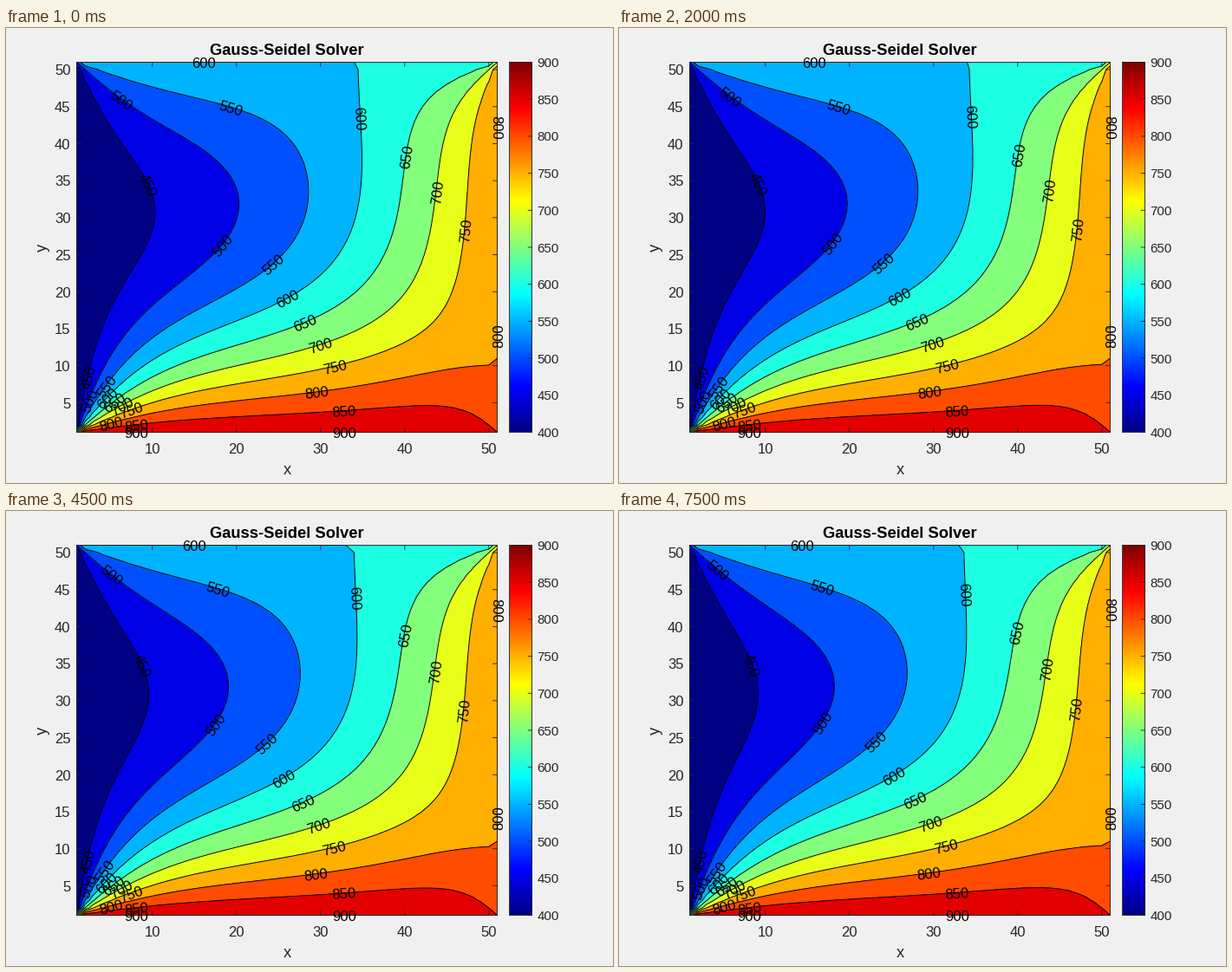
Recreate the animation shown at these times as a matplotlib script. Size 700 by 525 pixels, loop 8000 ms.

```python
import numpy as np
import matplotlib.pyplot as plt
from matplotlib.animation import FuncAnimation

W, H, DPI = 700, 525, 100
PT = 72 / DPI                       # points per pixel
N = 51                              # grid nodes per side
FRAMES, INTERVAL = 16, 500
START, SWEEPS = 547, 30             # sweeps before the loop, sweeps per loop
LEFT, RIGHT, TOP, BOTTOM = 81.5, 566.5, 39.5, 466.5
BAR_L, BAR_R = 580.5, 606.5
SPACING = 240                       # distance between labels on one contour
SLIDE = 0.18                        # share of a length change seen at the start
FONT = 16.67
GRAY = "#262626"

LEVELS = np.arange(400, 951, 50)
EPS = 1e-6                          # keeps walls that equal a level above it

# One point per contour that carries a label at the start
ANCHORS = {450: (162, 182), 500: (248, 249), 550: (307, 272), 600: (324, 311),
           650: (345, 341), 700: (362, 366), 750: (379, 391), 800: (358, 421),
           850: (390, 441), 900: (390, 467)}

plt.rcParams["font.family"] = "Liberation Sans"


def px(x):
    return LEFT + (x - 1) * (RIGHT - LEFT) / (N - 1)


def py(y):
    return BOTTOM - (y - 1) * (BOTTOM - TOP) / (N - 1)


def jet(k):
    """Classic 256-step jet colour, k = 1..256."""
    ramp = lambda lo, hi: np.clip(np.minimum(k - lo, hi - k) / 64, 0, 1)
    return np.stack([ramp(96, 288), ramp(32, 224), ramp(-32, 160)], axis=-1)


# ---- solver -------------------------------------------------------------
SWEEP = np.linalg.inv(np.eye(N - 2) - 0.25 * np.eye(N - 2, k=-1))


def plate():
    t = np.zeros((N, N))
    t[0], t[-1], t[:, 0], t[:, -1] = 900, 600, 400, 800
    t[0, 0], t[0, -1], t[-1, 0], t[-1, -1] = 650, 850, 500, 700
    return t


def relax(t, count):
    """Gauss-Seidel sweeps, row by row, in place."""
    for _ in range(count):
        for j in range(1, N - 1):
            rhs = t[j - 1, 1:-1] + t[j + 1, 1:-1] + t[j, 2:]
            rhs[0] += t[j, 0]
            t[j, 1:-1] = SWEEP @ (0.25 * rhs)


def solve():
    """Temperature field shown by each frame."""
    t = plate()
    states, done = [], 0
    for i in range(FRAMES):
        goal = START + i * SWEEPS // FRAMES
        relax(t, goal - done)
        done = goal
        states.append(t.copy())
    return states


# ---- stage --------------------------------------------------------------
fig = plt.figure(figsize=(W / DPI, H / DPI), dpi=DPI, facecolor=(0.94,) * 3)
ax = fig.add_axes([0, 0, 1, 1])
ax.axis("off")


def text(x, y, s, size=FONT, color=GRAY, ha="center", **kw):
    return ax.text(x, y, s, fontsize=size * PT, color=color, ha=ha,
                   va="baseline", rotation_mode="anchor", **kw)


def line(xs, ys):
    ax.plot(xs, ys, color=GRAY, lw=0.9 * PT, snap=False, zorder=4)


def frame(l, r):
    line([l, r, r, l, l], [TOP, TOP, BOTTOM, BOTTOM, TOP])


def draw_axes():
    frame(LEFT, RIGHT)
    for v in range(10, 51, 10):
        x = px(v)
        line([x, x], [BOTTOM, BOTTOM - 4.85])
        line([x, x], [TOP, TOP + 4.85])
        text(x, 491, str(v))
    for v in range(5, 51, 5):
        y = py(v)
        line([LEFT, LEFT + 4.85], [y, y])
        line([RIGHT, RIGHT - 4.85], [y, y])
        text(74.5, y + 6.3, str(v), ha="right")
    text(324, 515, "x", 18.33)
    text(47, 253, "y", 18.33, rotation=90)
    text(324, 31, "Gauss-Seidel Solver", 18.33, "black", weight="bold")


def draw_colorbar():
    ramp = jet(np.arange(256, 0, -1))[:, None]
    ax.imshow(ramp, extent=(BAR_L, BAR_R, BOTTOM, TOP), aspect="auto",
              interpolation="nearest", zorder=1)
    frame(BAR_L, BAR_R)
    for v in range(400, 901, 50):
        y = BOTTOM - (v - 400) / 500 * (BOTTOM - TOP)
        line([BAR_R - 4.3, BAR_R], [y, y])
        text(612.5, y + 5.6, str(v), 15, ha="left")


draw_axes()
draw_colorbar()
ax.set_xlim(0, W)
ax.set_ylim(H, 0)
ax.set_autoscale_on(False)

# ---- contours -----------------------------------------------------------
GX, GY = np.meshgrid(px(np.arange(1, N + 1)), py(np.arange(1, N + 1)))
FILLS = jet(np.minimum(np.floor((LEVELS[:-1] - 400) / 500 * 256) + 1, 256))


class Curve:
    """Polyline measured by arc length from its lower left end."""

    def __init__(self, pts):
        ends = np.hypot(*(pts[[0, -1]] - (LEFT, BOTTOM)).T)
        self.pts = pts if ends[0] <= ends[1] else pts[::-1]
        steps = np.hypot(*np.diff(self.pts, axis=0).T)
        self.s = np.concatenate([[0], np.cumsum(steps)])
        self.length = self.s[-1]

    def at(self, s):
        return np.array([np.interp(s, self.s, c) for c in self.pts.T])

    def nearest(self, point):
        s = np.arange(0, self.length, 0.25)
        x, y = self.at(s)
        return s[np.argmin(np.hypot(x - point[0], y - point[1]))]


def curves(lines):
    for level, segs in zip(LEVELS, lines.allsegs):
        if level in ANCHORS and segs:
            yield level, Curve(np.asarray(max(segs, key=len)))


def add_label(level, curve, s):
    x, y = curve.at(s)
    dx, dy = curve.at(s + 13) - curve.at(s - 13)
    deg = (np.degrees(np.arctan2(-dy, dx)) + 90) % 180 - 90
    if level == 800 and abs(deg) > 89:          # along the right wall
        deg = 90 if y > H / 2 else -90
    a = np.radians(deg)
    return text(x + 6.6 * np.sin(a), y + 6.6 * np.cos(a), str(level),
                color="black", rotation=deg, zorder=6)


states = solve()
first = {}                          # label offset and length at the start
live = []


def update(i):
    for artist in live:
        artist.remove()
    live.clear()
    t = states[i]
    fill = ax.contourf(GX, GY, t, LEVELS - EPS, colors=FILLS, zorder=2)
    lines = ax.contour(GX, GY, t, LEVELS - EPS, colors="black",
                       linewidths=0.95 * PT, zorder=3)
    lines.set_snap(False)
    live.extend([fill, lines])
    for level, curve in curves(lines):
        if level not in first:
            first[level] = curve.nearest(ANCHORS[level]) % SPACING, curve.length
        offset, length = first[level]
        offset += SLIDE * (curve.length - length)
        for s in np.arange(offset, curve.length, SPACING):
            live.append(add_label(level, curve, s))
    return live


update(0)
anim = FuncAnimation(fig, update, frames=FRAMES, interval=INTERVAL,
                     init_func=lambda: update(0), repeat=True, repeat_delay=0)
plt.show()
```
